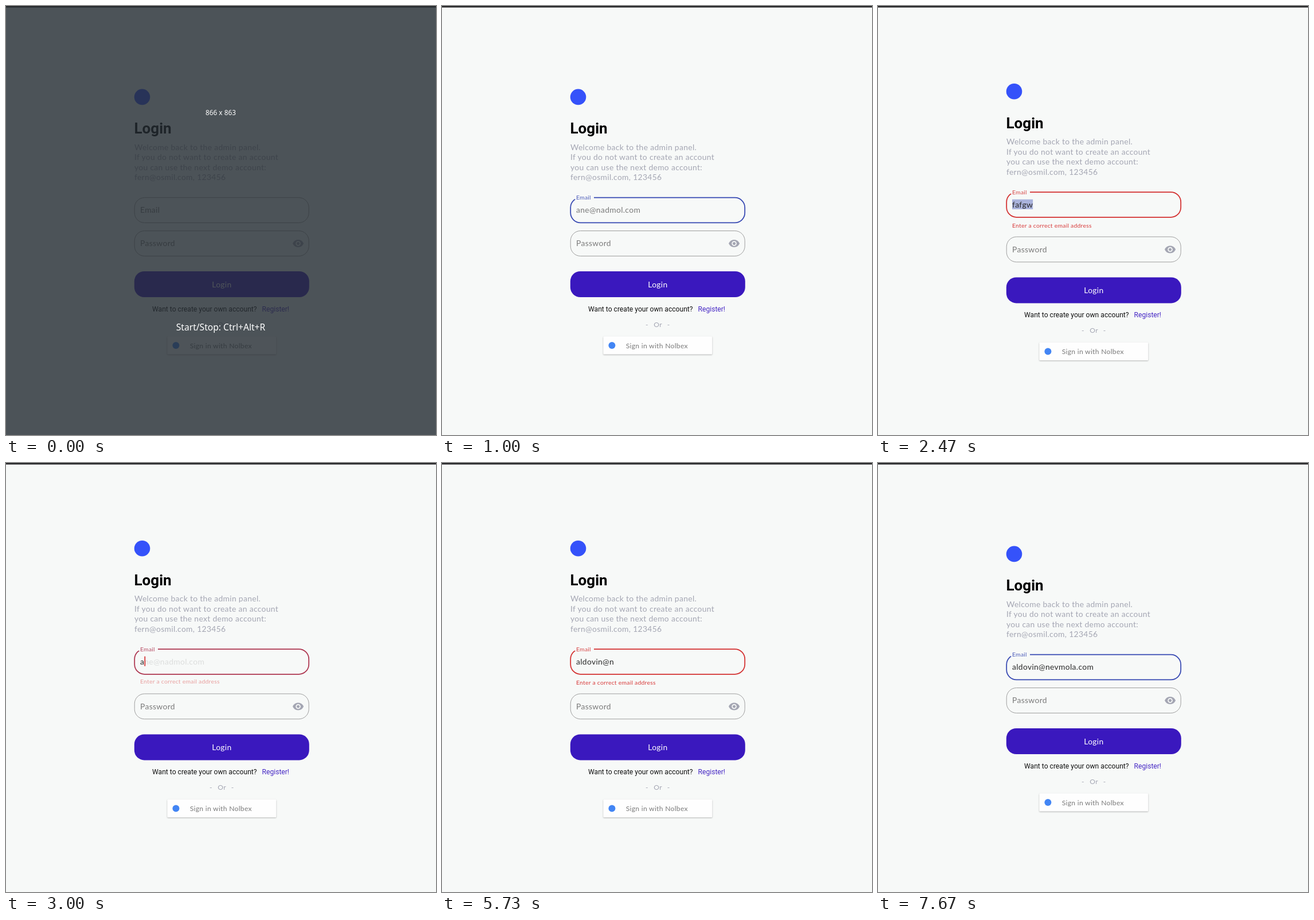
An HTML page for the animation above (8000 ms loop, 750 px wide and 747 px high).

```html
<!DOCTYPE html>
<html lang="en">
<head>
<meta charset="utf-8">
<title>Login form</title>
<style>
  html, body { margin: 0; width: 100%; height: 100%; overflow: hidden; background: #f7f9f8; }
  svg { display: block; width: 750px; height: 747px; }
  text { font: 13.86px Lato, sans-serif; letter-spacing: .024em; }
  .title { font: 700 26px Roboto, sans-serif; letter-spacing: 0; }
  .note { font: 12.12px Roboto, sans-serif; letter-spacing: 0; }
  .small { font-size: 12.12px; }
  .tiny { font-size: 10.4px; }
  .screen { font: 15.6px "Noto Sans", sans-serif; letter-spacing: 0; fill: #fff; text-anchor: middle; }
  .muted { fill: #a4a6b3; }
  .grey { fill: #7a7a7a; }
  .box { fill: none; stroke: #9e9e9e; }
  .card { fill: #fefefe; filter: drop-shadow(0 1px 1px rgba(0, 0, 0, .28)); }
  #veil { animation: veil 8s step-end infinite; }
  @keyframes veil { 0% { visibility: visible } .875%, 100% { visibility: hidden } }
</style>
</head>
<body>
<svg viewBox="0 0 750 747">
  <rect width="750" height="747" fill="#f7f9f8"/>
  <rect width="750" height="2.6" fill="#2a2a2c"/>

  <g id="upper">
    <circle cx="237.5" cy="158.4" r="13.8" fill="#3552fa"/>
    <text class="title" x="223.5" y="222.3">Login</text>
    <g class="muted">
      <text x="224" y="251">Welcome back to the admin panel.</text>
      <text x="224" y="268.4">If you do not want to create an account</text>
      <text x="224" y="285.8">you can use the next demo account:</text>
      <text x="224" y="303.2">fern@osmil.com, 123456</text>
    </g>

    <rect id="frame" class="box" x="224.2" y="333.7" width="304" height="43.7" rx="17.3"/>
    <text id="placeholder" class="grey" x="234" y="360.3">Email</text>

    <g id="active">
      <rect x="231.5" y="331" width="33.5" height="5.8" fill="#f7f9f8"/>
      <text id="label" class="tiny" x="234" y="337.3" opacity=".88">Email</text>
      <text id="hint" class="grey" x="234" y="360.3">ane@nadmol.com</text>
      <rect id="mark" x="234" y="346.3" height="17.2" fill="#3f51b5" opacity=".42"/>
      <text id="typed" x="234" y="360.3" fill="#2a2a2a"></text>
      <rect id="caret" y="346.3" width="1.7" height="17"/>
      <text id="error" class="tiny" x="234" fill="#d83c3c">Enter a correct email address</text>
    </g>
  </g>

  <g id="lower">
    <rect class="box" x="224.2" y="391.5" width="304" height="43.9" rx="17.3"/>
    <text class="grey" x="234" y="418.3">Password</text>
    <path class="muted" transform="translate(499.2 403.2) scale(.866)" d="M12 4.5C7 4.5 2.73 7.61 1 12c1.73 4.39 6 7.5 11 7.5s9.27-3.11 11-7.5c-1.73-4.39-6-7.5-11-7.5zM12 17c-2.76 0-5-2.24-5-5s2.24-5 5-5 5 2.24 5 5-2.24 5-5 5zm0-8c-1.66 0-3 1.34-3 3s1.34 3 3 3 3-1.34 3-3-1.34-3-3-3z"/>
    <rect x="223.8" y="462" width="305" height="45" rx="17.3" fill="#3a18be"/>
    <text x="376.4" y="490" fill="#fff" text-anchor="middle" font-weight="600">Login</text>
    <text class="note" x="255" y="531.5" fill="#111">Want to create your own account?</text>
    <text class="note" x="446.5" y="531.5" fill="#4527c4">Register!</text>
    <g class="muted">
      <text class="small" x="355" y="559">-</text>
      <text class="small" x="369.3" y="559">Or</text>
      <text class="small" x="392.8" y="559">-</text>
    </g>
    <rect class="card" x="281.3" y="575.3" width="190" height="31.2" rx="1.5"/>
    <circle cx="296.4" cy="591" r="6" fill="#4285f4"/>
    <text class="small grey" x="320.7" y="595.6">Sign in with Nolbex</text>
  </g>

  <g id="veil">
    <rect y="1" width="750" height="746" fill="#262d33" opacity=".81"/>
    <text class="screen" x="374.5" y="190" style="font-size:11.8px">866 x 863</text>
    <text class="screen" x="374.5" y="565">Start/Stop: Ctrl+Alt+R</text>
  </g>
</svg>

<script>
const $ = id => document.getElementById(id);
const clamp = x => Math.max(0, Math.min(1, x));
const LOOP = 8000, HOVER = 530, FOCUS = 670, SELECT = 2470, CLEAR = 2730;
const BLINK = 440, HINT_FADE = 90, ERROR_FADE = 150;
const BLUE = [54, 72, 178], RED = [211, 47, 47];

// The field is emptied, then typed in bursts; its error lasts until `valid`.
const rounds = [
  { empty: HOVER, valid: CLEAR + 70, bursts: [
    { start: 1400, text: 'fafgw', gap: 67 }
  ] },
  { empty: CLEAR, valid: 7130, bursts: [
    { start: 2930, text: 'ald', gap: 100 },
    { start: 3330, text: 'ovin', gap: 165 },
    { start: 4670, text: '@', gap: 100 },
    { start: 5270, text: 'n', gap: 100 },
    { start: 5800, text: 'evmola.com', gap: 158 }
  ] }
];

// Text typed so far and the time of the last key.
function typing({ empty, bursts }, t) {
  let text = '', last = empty;
  for (const b of bursts) {
    if (t < b.start) break;
    const count = Math.min(b.text.length, Math.floor((t - b.start) / b.gap) + 1);
    text += b.text.slice(0, count);
    last = b.start + (count - 1) * b.gap;
  }
  return { text, last };
}

// Error row of a round: whether it takes up space, and its opacity.
function errorRow({ bursts, valid }, t) {
  const since = t - bursts[0].start, left = valid - t;
  const open = since >= 0 && left > 0;
  return { open, strength: open ? clamp(Math.min(since, left) / ERROR_FADE) : 0 };
}

const mix = k => `rgb(${BLUE.map((c, i) => Math.round(c + (RED[i] - c) * k))})`;
const set = (id, attrs) => {
  for (const name in attrs) $(id).setAttribute(name, attrs[name]);
};
const show = (id, on) => { $(id).style.display = on ? '' : 'none'; };

function draw(t) {
  const focused = t >= FOCUS, selected = t >= SELECT && t < CLEAR;
  const round = rounds[t < CLEAR ? 0 : 1];
  const { text, last } = typing(round, t);
  const rows = rounds.map(r => errorRow(r, t));
  const { open, strength } = rows.find(r => r.open) || rows[0];
  const color = mix(clamp(strength * 1.6));

  set('upper', { transform: `translate(0 ${open ? -9.6 : 0})` });
  set('lower', { transform: `translate(0 ${open ? 10.4 : 0})` });
  show('placeholder', !focused);
  show('active', focused);
  $('frame').style.stroke = focused ? color : t >= HOVER ? '#757575' : '';
  $('frame').style.strokeWidth = focused ? 1.75 : 1;
  if (!focused) return;

  const fade = text ? 1 - (t - round.bursts[0].start) / HINT_FADE
                    : (t - round.empty) / HINT_FADE;
  set('label', { fill: color });
  set('hint', { opacity: clamp(fade) });
  set('error', { opacity: strength, y: 392.6 + 3 * strength });

  $('typed').textContent = text;
  const width = text ? $('typed').getComputedTextLength() : 0;
  show('mark', selected);
  set('mark', { width });
  show('caret', !selected && Math.floor((t - last) / BLINK) % 2 === 0);
  set('caret', { x: 234.2 + width, fill: mix(open ? 1 : 0) });
}

const begin = performance.now();
function tick() {
  draw((performance.now() - begin) % LOOP);
  requestAnimationFrame(tick);
}
tick();
</script>
</body>
</html>
```
